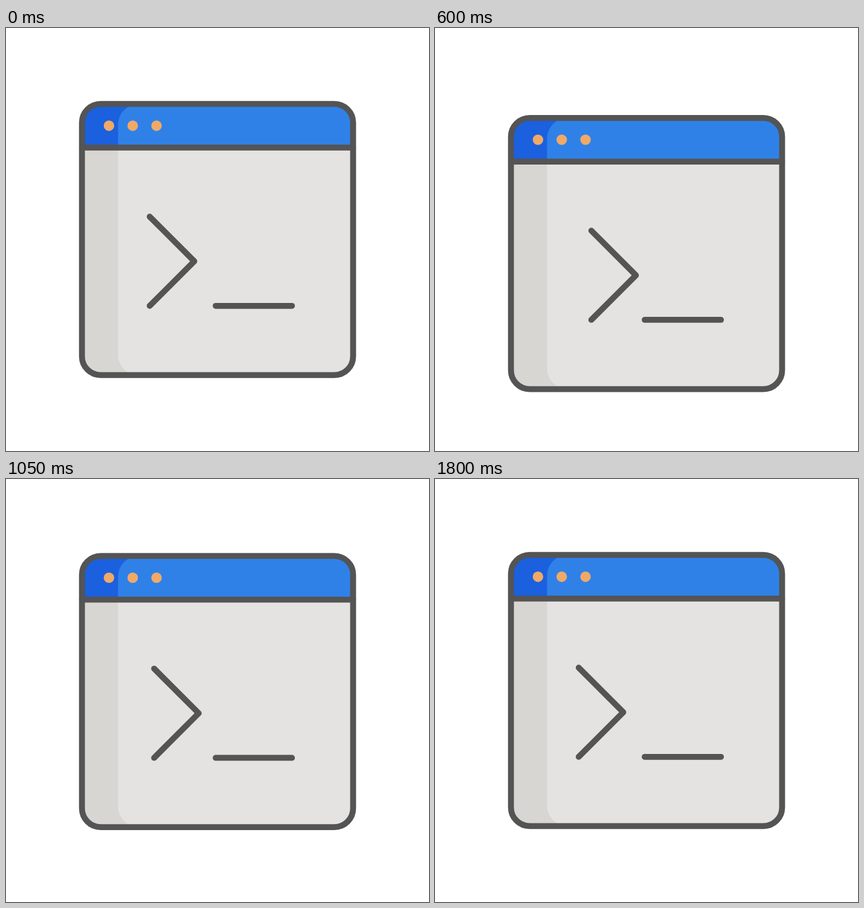
An HTML page for the animation above (2830 ms loop, 700x700 px).

```html
<!DOCTYPE html>
<html lang="en">
<head>
<meta charset="utf-8">
<title>Terminal window</title>
<style>
  html, body { margin: 0; width: 100%; height: 100%; overflow: hidden; background: #fff; }
  svg { display: block; width: 100%; height: 100%; }
  .line { fill: none; stroke: #545454; stroke-width: 9.8; stroke-linecap: round; stroke-linejoin: round; }
</style>
</head>
<body>
<svg viewBox="0 0 700 700">
  <defs>
    <clipPath id="frame"><rect x="125.7" y="125.7" width="448.7" height="448.7" rx="31"/></clipPath>
    <clipPath id="bar"><rect x="120" y="120" width="460" height="78"/></clipPath>
  </defs>
  <g id="window">
    <g clip-path="url(#frame)">
      <rect x="120" y="120" width="460" height="460" fill="#d7d6d2"/>
      <rect x="185.4" y="125.7" width="420" height="448.7" rx="34" fill="#e4e3e1"/>
      <g clip-path="url(#bar)">
        <rect x="120" y="120" width="460" height="78" fill="#1b60de"/>
        <rect x="185.4" y="125.7" width="420" height="448.7" rx="34" fill="#2f81e8"/>
      </g>
    </g>
    <g fill="#f0a967">
      <circle cx="170.4" cy="161.7" r="8.7"/>
      <circle cx="209.7" cy="161.7" r="8.7"/>
      <circle cx="249.1" cy="161.7" r="8.7"/>
    </g>
    <path class="line" d="M125.7 197.9H574.4"/>
    <rect class="line" x="125.7" y="125.7" width="448.7" height="448.7" rx="31"/>
    <path class="line" id="chevron" d="M237.8 312.2L311.6 386L237.8 459.8"/>
    <path class="line" id="cursor" d="M347 459.8H473.2"/>
  </g>
</svg>
<script>
  const LOOP = 2830, ACTIVE = 1800, STEP = 30;
  const part = id => document.getElementById(id);
  const smooth = u => u * u * (3 - 2 * u);

  // Cubic Bézier easing with handles (a, 0) and (b, 1).
  function ease(a, b, u) {
    let lo = 0, hi = 1;
    for (let i = 0; i < 24; i++) {
      const s = (lo + hi) / 2, r = 1 - s;
      if (3 * s * r * r * a + 3 * s * s * r * b + s ** 3 < u) lo = s;
      else hi = s;
    }
    return smooth(lo);
  }

  function windowDrop(t) {
    const peak = 435, fall = 800;
    if (t < peak) return 28 * ease(0.33, 0.62, t / peak);
    return 28 * (1 - ease(0.29, 0.41, Math.min(1, (t - peak) / fall)));
  }

  function chevronShift(t) {
    const phase = t % 900 / 450;
    return 28.2 * smooth(phase < 1 ? phase : 2 - phase);
  }

  const cursorShown = t => (t + 450) % 600 >= 300;

  function draw() {
    const now = performance.now() % LOOP;
    const t = Math.min(ACTIVE, Math.floor(now / STEP) * STEP);
    part("window").setAttribute("transform", `translate(0 ${windowDrop(t).toFixed(3)})`);
    part("chevron").setAttribute("transform", `translate(${chevronShift(t).toFixed(3)} 0)`);
    part("cursor").style.visibility = cursorShown(t) ? "visible" : "hidden";
    requestAnimationFrame(draw);
  }
  draw();
</script>
</body>
</html>
```
